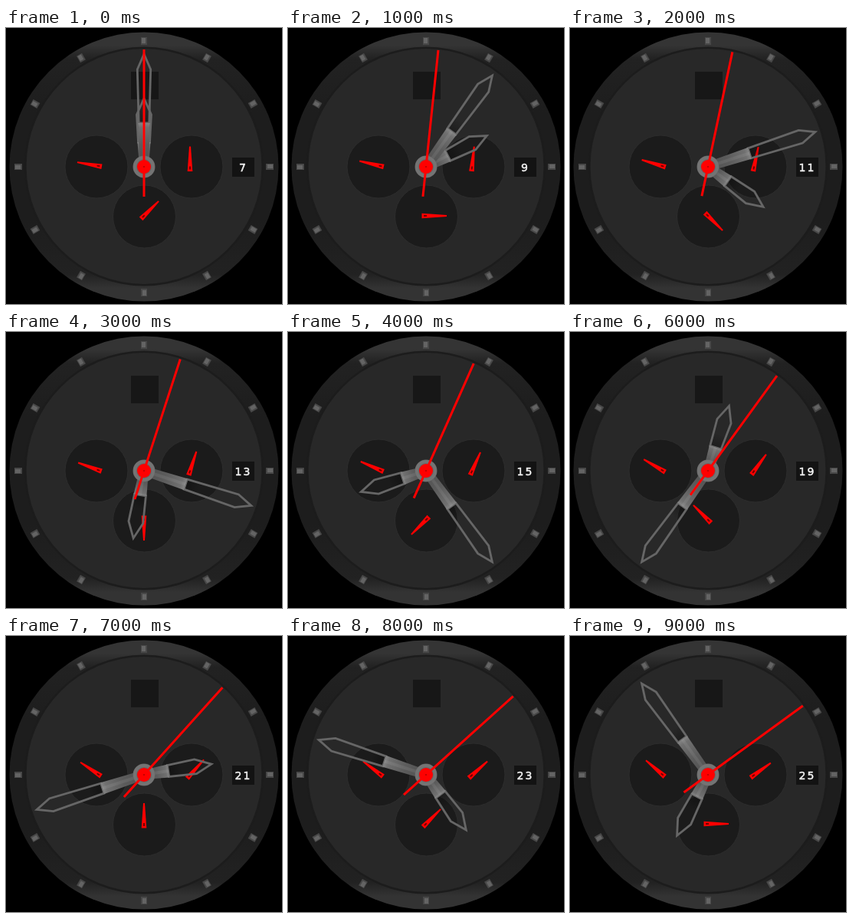
An HTML page with a canvas that plays this animation: 360x360 px, repeating every 10 s.

```html
<!DOCTYPE html>
<html lang="en">
<head>
<meta charset="utf-8">
<title>Chronograph</title>
<style>
  html, body { margin: 0; width: 100%; height: 100%; overflow: hidden; background: #000; }
  canvas { display: block; width: 360px; height: 360px; }
</style>
</head>
<body>
<canvas id="watch" width="360" height="360"></canvas>
<script>
const ctx = document.getElementById('watch').getContext('2d');
const RED = '#ff0000';
const STEPS = 10;
const STEP_MS = 1000;
const CX = 180, CY = 181;

function disc(x, y, r, fill) {
  ctx.beginPath();
  ctx.arc(x, y, r, 0, Math.PI * 2);
  ctx.fillStyle = fill;
  ctx.fill();
}

function ring(x, y, r, width, color) {
  ctx.beginPath();
  ctx.arc(x, y, r, 0, Math.PI * 2);
  ctx.lineWidth = width;
  ctx.strokeStyle = color;
  ctx.stroke();
}

// Draws with the origin at the pivot and "up" turned clockwise by deg.
function turned(x, y, deg, draw) {
  ctx.save();
  ctx.translate(x, y);
  ctx.rotate(deg * Math.PI / 180);
  draw();
  ctx.restore();
}

function polygon(points) {
  ctx.beginPath();
  points.forEach(([x, y]) => ctx.lineTo(x, y));
  ctx.closePath();
}

function gradient(y0, y1, stops) {
  const g = ctx.createLinearGradient(0, y0, 0, y1);
  stops.forEach(([at, color]) => g.addColorStop(at, color));
  return g;
}

function drawCase() {
  ctx.fillStyle = '#000';
  ctx.fillRect(0, 0, 360, 360);
  disc(180, 181, 175.5, gradient(5, 357, [
    [0, '#343434'], [0.05, '#343434'], [0.1, '#222222'], [0.3, '#1d1d1d'],
    [0.7, '#1d1d1d'], [0.9, '#222222'], [0.95, '#333333'], [1, '#333333']
  ]));
  disc(180, 180.5, 156, '#1c1c1c');
  disc(180, 180.5, 153.5, '#282828');

  for (let i = 0; i < 12; i++) {
    turned(180, 181, i * 30, () => {
      ctx.fillStyle = '#484848';
      ctx.fillRect(-4, -169, 8, 10);
      ctx.fillStyle = '#646464';
      ctx.fillRect(-3, -168, 5, 7);
    });
  }

  ctx.fillStyle = '#171717';
  ctx.fillRect(163, 57, 36, 36);

  [[118, 181], [242, 181], [180.5, 246]].forEach(([x, y]) => {
    disc(x, y, 41, '#1b1b1b');
    ring(x, y, 41, 1, '#2d2d2d');
  });
}

function drawDate(day) {
  ctx.fillStyle = '#131313';
  ctx.fillRect(295, 169, 29, 25);
  ctx.fillStyle = ctx.strokeStyle = '#f4f4f4';
  ctx.font = '14px "DejaVu Sans", sans-serif';
  ctx.letterSpacing = '2px';
  ctx.textAlign = 'center';
  ctx.textBaseline = 'alphabetic';
  ctx.lineWidth = 0.5;
  ctx.fillText(day, 309.5, 186.5);
  ctx.strokeText(day, 309.5, 186.5);
}

function drawSmallHand(x, y, deg) {
  turned(x, y, deg, () => {
    polygon([[-1, -27], [1, -27], [3.3, 5.5], [-3.3, 5.5]]);
    ctx.fillStyle = RED;
    ctx.fill();
    ctx.fillStyle = '#700000';
    ctx.fillRect(-1, -1, 2, 4);
  });
}

// Solid shank up to base, then an open pointed frame.
function drawHand(deg, { base, baseHalf, kink, kinkHalf, tip }) {
  turned(CX, CY, deg, () => {
    polygon([[-baseHalf, -base], [-kinkHalf, -kink], [0, -tip], [kinkHalf, -kink], [baseHalf, -base]]);
    ctx.fillStyle = gradient(-base, -base - 18, [[0, 'rgba(0,0,0,.28)'], [1, 'rgba(0,0,0,0)']]);
    ctx.fill();
    ctx.lineWidth = 2.8;
    ctx.lineJoin = 'miter';
    ctx.strokeStyle = '#666';
    ctx.stroke();
    polygon([[-6, 0], [-baseHalf - 1, -base], [baseHalf + 1, -base], [6, 0]]);
    ctx.fillStyle = gradient(0, -base, [[0, '#505050'], [0.5, '#5c5c5c'], [0.9, '#707070'], [1, '#848484']]);
    ctx.fill();
    ctx.fillStyle = 'rgba(255,255,255,.07)';
    ctx.fillRect(-2, -base, 4, base);
  });
}

const HOUR = { base: 32, baseHalf: 7.5, kink: 68, kinkHalf: 9.5, tip: 89 };
const MINUTE = { base: 57, baseHalf: 6.8, kink: 127, kinkHalf: 8.7, tip: 147 };

function drawSeconds(deg) {
  turned(CX, CY, deg, () => {
    ctx.fillStyle = RED;
    ctx.fillRect(-1.5, -153, 3, 192);
  });
  disc(CX, CY, 9, RED);
  disc(CX, CY, 1, '#b00000');
}

function draw(step) {
  drawCase();
  drawDate(7 + 2 * step);
  drawSmallHand(119.5, 179.8, 280 + 3.4 * step);
  drawSmallHand(240, 181.5, 6 * step);
  drawSmallHand(180, 245, 45 + 45 * step);
  drawHand(63 * step, HOUR);
  drawHand(36 * step, MINUTE);
  disc(CX, CY, 14.5, '#666');
  ring(CX, CY, 12, 4, '#747474');
  drawSeconds(6 * step);
}

const start = performance.now();
function tick() {
  const elapsed = performance.now() - start;
  draw(Math.floor(elapsed / STEP_MS) % STEPS);
  requestAnimationFrame(tick);
}
tick();
</script>
</body>
</html>
```
